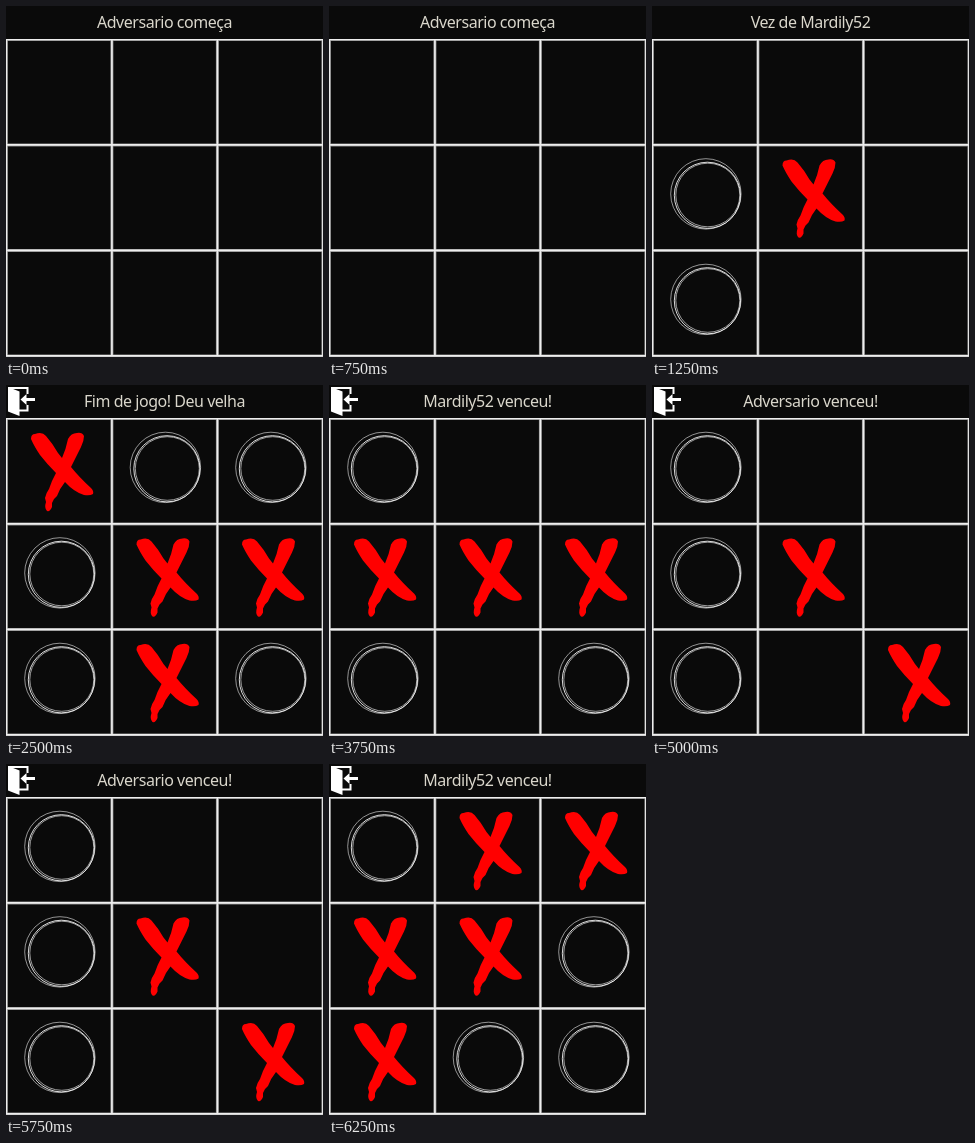
Animation of 317 by 351 pixels, one loop 7.5 s. Source, as an HTML page:

```html
<!DOCTYPE html>
<html lang="pt">
<head>
<meta charset="utf-8">
<title>Jogo da velha</title>
<style>
  html, body { margin: 0; height: 100%; overflow: hidden; background: #0a0a0a; }
  svg { display: block; }
  text {
    font: 16px "Noto Sans", "Open Sans", sans-serif;
    letter-spacing: -.47px;
    fill: #dad7cc;
    text-anchor: middle;
  }
</style>
</head>
<body>
<svg width="317" height="351" viewBox="0 0 317 351">
  <defs>
    <!-- Marks are drawn relative to the top left corner of a cell -->
    <path id="X" fill="#f00" d="M25 21 Q25 16 29 16 Q36 13 40 18 Q47 26 52 35 L56 40
      Q60 31 62 21 Q65 15 71 15 Q76 14 78 18 Q78 23 75 29 L65 49 Q73 59 85 70 Q88 73 87 76
      Q84 78 78 77 Q68 74 59 64 Q54 70 51 78 L48 81 L46 85 L46 89 Q44 94 41 93 Q38 90 40 84
      L39 80 Q40 75 43 71 Q46 62 50 55 Q41 46 34 37 Q28 28 25 21Z"/>
    <g id="O" fill="none" stroke="#fff">
      <circle cx="53.9" cy="49.4" r="35.2" stroke-width=".8" opacity=".7"/>
      <circle cx="55.4" cy="50.8" r="33.1" stroke-width="1" opacity=".85"/>
      <ellipse cx="55.8" cy="50.5" rx="32" ry="31.8" stroke-width=".8" opacity=".75"/>
    </g>
  </defs>
  <rect width="317" height="351" fill="#0a0a0a"/>
  <g id="marks"></g>
  <g fill="none">
    <path id="edges" stroke="#888" stroke-width="3"/>
    <path id="lines" stroke="#eee" stroke-width="1.6"/>
  </g>
  <rect width="317" height="33" fill="#0a0a0a"/>
  <text id="title" x="158.5" y="22"></text>
  <g id="exit" fill="#fff">
    <path d="M2 2 L13.5 6.5 V31 L2 26.5Z"/>
    <path d="M2 3 H21.5 V9 M21.5 20 V25.5 H13" fill="none" stroke="#fff" stroke-width="2"/>
    <path d="M14.5 14.5 L20.5 9 V13 H29 V16 H20.5 V20Z"/>
  </g>
</svg>
<script>
const PITCH = 105.5, TOP = 33, STEP = 1250;
const PLAYER = "Mardily52";
const scenes = [
  ["Adversario começa", "........."],
  [`Vez de ${PLAYER}`, "...OX.O.."],
  ["Fim de jogo! Deu velha", "XOOOXXOXO", true],
  [`${PLAYER} venceu!`, "O..XXXO.O", true],
  ["Adversario venceu!", "O..OX.O.X", true],
  [`${PLAYER} venceu!`, "OXXXXOXOO", true]
];
const byId = id => document.getElementById(id);

const grid = [0, 1, 2, 3].map(i => {
  const x = 0.4 + i * PITCH, y = TOP + 0.4 + i * PITCH;
  return `M${x} ${TOP}V350M0 ${y}H317`;
}).join("");
byId("edges").setAttribute("d", grid);
byId("lines").setAttribute("d", grid);

function show([title, board, finished]) {
  byId("title").textContent = title;
  byId("exit").style.display = finished ? "" : "none";
  byId("marks").innerHTML = [...board].map((mark, i) => mark === "." ? "" :
    `<use href="#${mark}" x="${i % 3 * PITCH}" y="${TOP + Math.floor(i / 3) * PITCH}"/>`
  ).join("");
}

let current = -1;
function tick() {
  const index = Math.floor(performance.now() / STEP) % scenes.length;
  if (index !== current) show(scenes[current = index]);
  requestAnimationFrame(tick);
}
tick();
</script>
</body>
</html>
```
